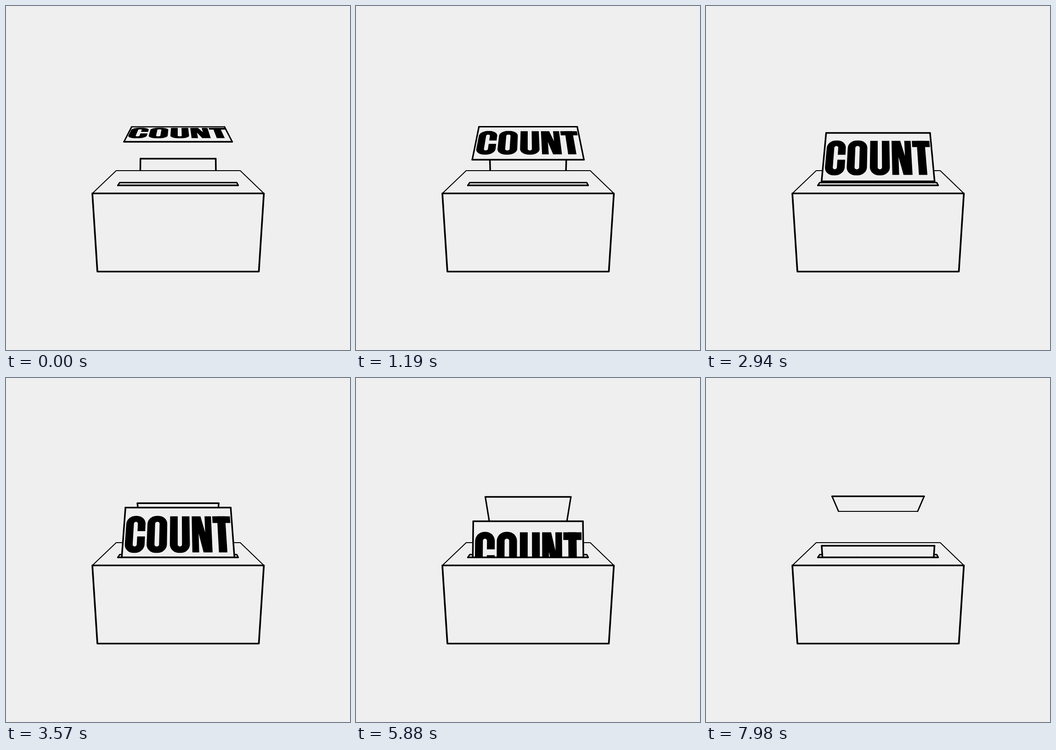
These frames come from a looping animation (749 by 748 pixels, 8000 ms). An HTML page with a canvas:

```html
<!DOCTYPE html>
<html lang="en">
<head>
<meta charset="utf-8">
<title>Ballot box</title>
<style>
  html, body { margin: 0; width: 100%; height: 100%; overflow: hidden; background: #efefef; }
  canvas { display: block; }
</style>
</head>
<body>
<canvas id="stage" width="749" height="748" role="img" aria-label="COUNT"></canvas>
<script>
const ctx = document.getElementById('stage').getContext('2d');
const PAPER = '#efefef', INK = '#000';
const LOOP = 8000, STEP = 70;

// Camera and wheel; lengths are in half widths of the lettered card.
const CX = 374.7, CY = 374, FOCAL = 675;
const HUB = 6.58, RADIUS = 1, CARD = 1.037, WORD_LIFT = 0.035;
const SLOT_Y = 390;

// Wheel angle in degrees at given seconds, joined by a smooth curve.
const KEYS = [[0, 24.4], [1.19, 43.3], [2.31, 57], [3.57, 67.4], [4.83, 77.3], [5.88, 86], [7.98, 110.3]];

function slope(i) {
  const a = KEYS[Math.max(i - 1, 0)], b = KEYS[Math.min(i + 1, KEYS.length - 1)];
  return (b[1] - a[1]) / (b[0] - a[0]);
}

function wheelAngle(t) {
  let i = 0;
  while (i < KEYS.length - 2 && t > KEYS[i + 1][0]) i++;
  const [t0, a0] = KEYS[i], [t1, a1] = KEYS[i + 1];
  const h = t1 - t0, s = (t - t0) / h, r = 1 - s;
  return r * r * (1 + 2 * s) * a0 + s * s * (3 - 2 * s) * a1
    + h * s * r * (r * slope(i) - s * slope(i + 1));
}

// Returns a projection from card coordinates (x, distance from trailing edge,
// lift above the face) to the stage.
function cardPlane(degrees) {
  const a = degrees * Math.PI / 180, sin = Math.sin(a), cos = Math.cos(a);
  const depth = HUB - RADIUS * sin;
  const height = 0.06 - 0.062 * (depth - 5.7) - RADIUS * cos;
  return (x, y, lift = 0) => {
    const along = y - CARD / 2;
    const scale = FOCAL / (depth - along * cos - lift * sin);
    return [CX + x * scale, CY + (height + along * sin - lift * cos) * scale];
  };
}

function trace(points, close = true) {
  ctx.beginPath();
  points.forEach(p => ctx.lineTo(p[0], p[1]));
  if (close) ctx.closePath();
}

function fill(points, color) {
  trace(points);
  ctx.fillStyle = color;
  ctx.fill();
}

function line(width, ...points) {
  trace(points, false);
  ctx.lineWidth = width;
  ctx.stroke();
}

function drawCard(degrees, half) {
  const plane = cardPlane(degrees);
  const a = plane(-half, 0), b = plane(half, 0), c = plane(half, CARD), d = plane(-half, CARD);
  const weight = 2 + 1.5 * Math.min(1, Math.abs(degrees) / 65);
  const side = (weight + 3.5) / 2;
  fill([a, b, c, d], PAPER);
  line(weight, a, b);
  line(side, b, c);
  line(side, d, a);
  line(3.5, c, d);
  return plane;
}

// Rectangle with rounded top and bottom corners, as points.
function rounded(x0, x1, y0, y1, top = 0, bottom = 0) {
  const points = [];
  const corner = (cx, cy, r, quarter) => {
    for (let i = 0; i <= 8; i++) {
      const a = (quarter + i / 8) * Math.PI / 2;
      points.push([cx + r * Math.cos(a), cy + r * Math.sin(a)]);
    }
  };
  corner(x0 + top, y0 + top, top, 2);
  corner(x1 - top, y0 + top, top, 3);
  corner(x1 - bottom, y1 - bottom, bottom, 0);
  corner(x0 + bottom, y1 - bottom, bottom, 1);
  return points;
}

// The word COUNT, lettered just above the face of the card.
function drawWord(plane) {
  const T = 0.206, B = 0.928, OVER = 0.009, STEM = 0.14, CURVE = 0.165;
  const put = (points, color = INK) => fill(points.map(p => plane(p[0], p[1], WORD_LIFT)), color);
  const bowl = (x0, x1) => {
    put(rounded(x0, x1, T - OVER, B + OVER, CURVE, CURVE));
    put(rounded(x0 + STEM, x1 - STEM, T + 0.115, B - 0.115, 0.038, 0.038), PAPER);
  };

  bowl(-0.95, -0.597);
  put(rounded(-0.79, -0.58, T + 0.305, T + 0.41), PAPER);

  bowl(-0.561, -0.199);

  put(rounded(-0.147, 0.21, T, B + OVER, 0, CURVE));
  put(rounded(-0.007, 0.07, T - 0.01, B - 0.115, 0, 0.038), PAPER);

  const x = 0.252, mid = (T + B) / 2;
  put([[x, T], [x + 0.162, T], [x + 0.238, mid - 0.03], [x + 0.238, T], [x + 0.357, T],
       [x + 0.357, B], [x + 0.198, B], [x + 0.12, mid - 0.01], [x + 0.12, B], [x, B]]);

  put(rounded(0.632, 0.959, T, T + 0.138));
  put(rounded(0.721, 0.87, T, B));
}

function drawBox() {
  const a = [240, 358], b = [510, 358], c = [561.5, 407.5], d = [188, 407.5];
  const e = [550.5, 577.5], f = [199, 577.5];
  fill([a, b, c, e, f, d], PAPER);
  line(2, d, a, b, c);
  line(3.7, d, c, e, f, d);
  line(3, [243.5, SLOT_Y], [247.5, 384], [502.5, 384], [505.5, SLOT_Y]);
}

function render(ms) {
  const angle = wheelAngle(ms / 1000);
  ctx.fillStyle = PAPER;
  ctx.fillRect(0, 0, 749, 748);
  ctx.strokeStyle = INK;
  ctx.lineJoin = ctx.lineCap = 'round';

  drawCard(angle - 120, 0.926);
  drawBox();

  ctx.save();
  ctx.beginPath();
  ctx.rect(0, 0, 749, SLOT_Y);
  ctx.clip();
  drawWord(drawCard(angle, 0.994));
  ctx.restore();

  line(3.4, [243.5, SLOT_Y], [505.5, SLOT_Y]);
}

const start = performance.now();
function tick() {
  const t = (performance.now() - start) % LOOP;
  render(Math.floor(t / STEP) * STEP);
  requestAnimationFrame(tick);
}
tick();
</script>
</body>
</html>
```
